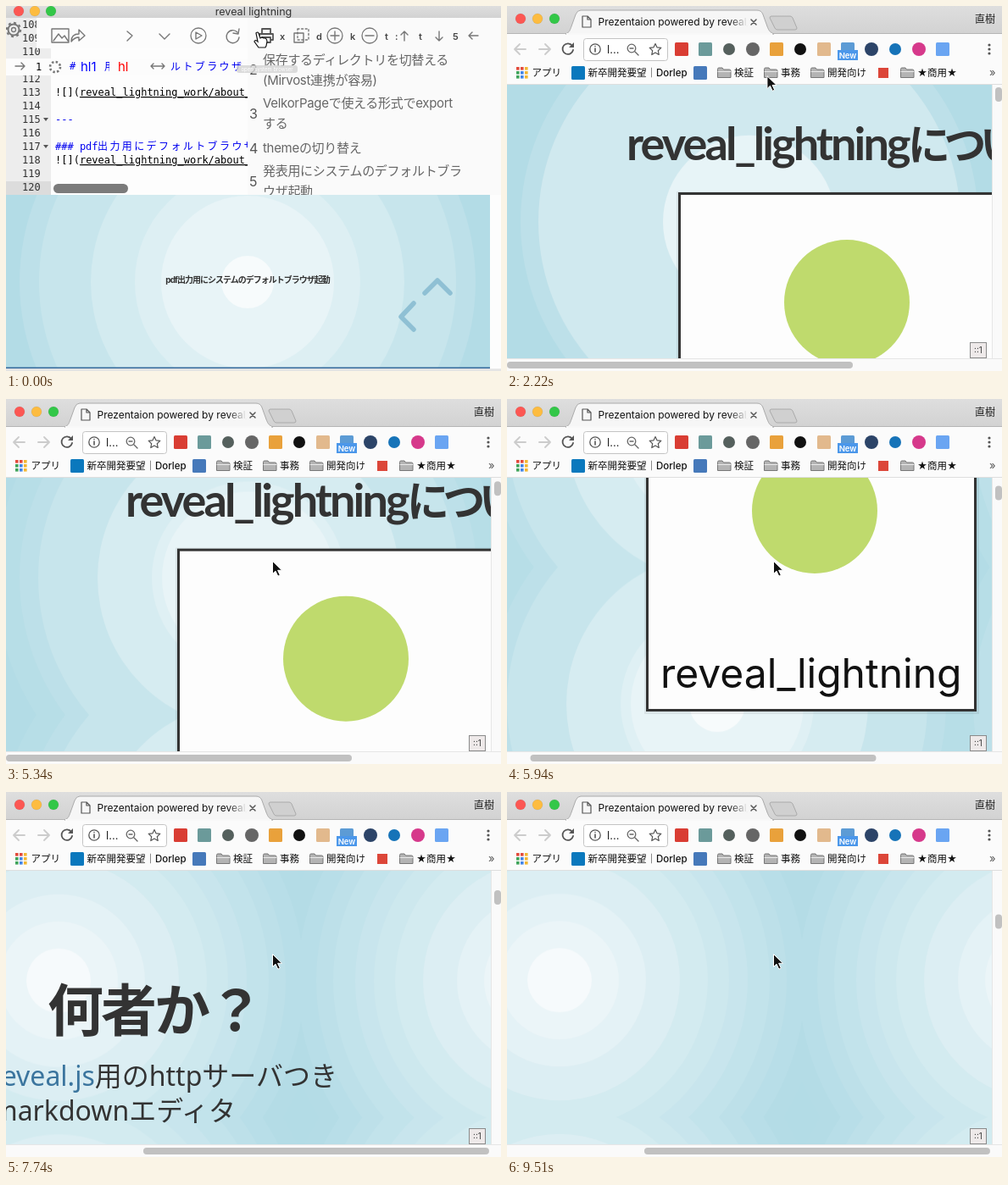
Write an HTML page that moves like this. It is 584 px wide and 431 px high and loops after 10 s.

```html
<!DOCTYPE html>
<html lang="ja">
<head>
<meta charset="utf-8">
<title>reveal lightning</title>
<style>
html, body { margin: 0; width: 100%; height: 100%; overflow: hidden; background: #fdfdfd; }
svg { display: block; width: 584px; height: 431px; }
text { font-family: Inter, 'Noto Sans CJK JP', 'Noto Sans CJK', sans-serif; white-space: pre; }
.mono { font-family: 'DejaVu Sans Mono', 'Noto Sans CJK JP', monospace; }
.noto { font-family: 'Noto Sans', 'Noto Sans CJK JP', sans-serif; }
.lato { font-family: Lato, 'Noto Sans CJK JP', sans-serif; }
.line { fill: none; stroke-linecap: round; stroke-linejoin: round; }
</style>
</head>
<body>
<svg id="stage" viewBox="0 0 584 431" xmlns="http://www.w3.org/2000/svg"></svg>
<script>
const text = (x, y, s, size, more = '') => `<text x="${x}" y="${y}" font-size="${size}" ${more}>${s}</text>`;
const rect = (x, y, w, h, fill, more = '') => `<rect x="${x}" y="${y}" width="${w}" height="${h}" fill="${fill}" ${more}/>`;
const dot = (x, y, r, fill, more = '') => `<circle cx="${x}" cy="${y}" r="${r}" fill="${fill}" ${more}/>`;
const line = (d, color = '#777', w = 1.4, more = '') => `<path class="line" d="${d}" stroke="${color}" stroke-width="${w}" ${more}/>`;
const ring = (x, y, r, color = '#777', w = 1.3, more = '') => dot(x, y, r, 'none', `stroke="${color}" stroke-width="${w}" ${more}`);
const group = (id, body) => `<g id="${id}">${body}</g>`;

// Sky gradient drawn as flat rings
const sky = k => `rgb(${[[247, 173], [251, 217], [252, 228]].map(([a, b]) => Math.round(a + (b - a) * k))})`;
const rings = (cx, cy, radii) => radii.map((r, n) =>
  dot(cx, cy, r, sky(n < radii.length - 1 ? (r + radii[n + 1]) / 658 : (r - 33) / 329))).join('');
const FLAT = [270, 249, 102];
const COARSE = [298, 270, 248, 178, 114, 102, 33];
const FINE = [310, 290, 268, 248, 222, 200, 175, 142, 102, 70, 38];
const TILE_W = 572, TILE_H = 323.5;
const tile = (id, radii) => `<pattern id="${id}" x="0" y="93" width="${TILE_W}" height="${TILE_H}" patternUnits="userSpaceOnUse">
  ${rect(0, 0, TILE_W, TILE_H, sky(.92))}${rings(TILE_W / 2, TILE_H / 2, radii)}</pattern>`;

const lights = (x, y, gap) => ['#fc5753', '#fdbc40', '#33c748'].map((c, n) =>
  dot(x + n * gap, y, 6, c, 'stroke="#000" stroke-opacity=".12" stroke-width=".6"')).join('');

function editor() {
  const row = n => 90 + (n - 112) * 16;
  const link = n => text(58, row(n), '![](<tspan text-decoration="underline">reveal_lightning_work/about_re</tspan>', 12, 'class="mono"');
  const wide = (x, y, s) => text(x, y, s, 12, 'class="mono" fill="#0000f0" letter-spacing="2.4"');
  const blue = (x, y, s) => text(x, y, s, 12, 'class="mono" fill="#0000f0"');
  let code = rect(0, 14, 53, 209, '#ededed') + rect(0, 207, 53, 16, '#dcdcdc');
  for (let n = 108; n <= 120; n++) if (n !== 111) code += text(19, row(n), n, 12, 'class="mono" fill="#333"');
  for (const n of [115, 117]) code += `<path d="M44 ${row(n) - 6}h6l-3 4z" fill="#555"/>`;
  code += link(113) + blue(58, row(115), '---') + blue(58, row(117), '### pdf') + wide(108, row(117), '出力用にデフォルトブラウザ') + link(118);
  code += rect(56, 210, 88, 11, '#7b7b7b', 'rx="5.5"');

  let tools = rect(36, 14, 249, 36, '#fcfcfc') + rect(0, 62, 285, 20, '#fcfcfc');
  tools += text(35, 76, '1', 12, 'class="mono"') + blue(75, 75, '#') + text(88, 77, 'hl1', 15, 'fill="#00f"')
    + `<g clip-path="inset(0 6px 0 0)">${blue(116, 76, '用')}</g>` + text(132, 77, 'hl', 15, 'fill="#f00"') + wide(194, 76, 'ルトブラウザ');
  tools += line('M11 71h11m-4-4l4 4-4 4M171 71h16m-13-3l-3 3 3 3m10-6l3 3-3 3');
  tools += ring(58, 72, 6, '#777', 2.6, 'stroke-dasharray="2.4 2.3"');
  tools += ring(9, 28, 6.5, '#777', 2) + ring(9, 28, 8.2, '#777', 2, 'stroke-dasharray="3 3.4"') + ring(9, 28, 2.5);

  let side = rect(285, 14, 299, 209, '#fafafa');
  const item = (y, s) => text(303, y, s, 15, 'fill="#666" letter-spacing="-.3"');
  side += item(69, '保存するディレクトリを切替える') + item(93, '(Mirvost連携が容易)')
    + item(120, 'VelkorPageで使える形式でexport') + item(144, 'する') + item(173, 'themeの切り替え')
    + item(200, '発表用にシステムのデフォルトブラ') + item(224, 'ウザ起動');
  [81, 133, 174, 213].forEach((y, n) => side += text(287, y, n + 2, 16, 'fill="#555"'));
  side += rect(272, 70, 72, 9, '#d4d4d4', 'rx="3" opacity=".8"') + text(308, 76.5, 'open system browser', 6, 'fill="#fff" text-anchor="middle"');

  let icons = line('M54 27h20v16h-20zM56 41l6-8 4 5 3-3 4 6M77 42c0-7 4-9 9-9v-5l7 7-7 6v-4c-4 0-6 1-9 5z');
  icons += line('M143 30l6 5-6 6M181 33l6 6 6-6') + ring(227, 35, 9) + line('M224 31v8l7-4z');
  icons += line('M273 31a7.5 7.5 0 1 0 2 6M275 27l-1 6-6-1');
  icons += line('M302 33v-6h10v6m-10 7h-3v-7h16v7h-3m-10-3h10v6h-10z', '#555', 1.8);
  icons += line('M344 27h13v13h-13z', '#777', 1.4, 'stroke-dasharray="2 2.6"') + line('M340 32h11v11h-11z');
  icons += ring(388, 35, 9) + line('M383 35h10m-5-5v10') + ring(429, 35, 9) + line('M424 35h10');
  icons += line('M470 41v-11m-4 4l4-4 4 4M511 30v11m-4-4l4 4 4-4M557 35h-11m4-4l-4 4 4 4');
  [[323, 'x'], [366, 'd'], [406, 'k'], [447, 't'], [459, ':'], [487, 't'], [527, '5']].forEach(([x, s]) =>
    icons += text(x, 40, s, 11, 'fill="#444" font-weight="600"'));

  let view = rect(0, 223, 571, 204, sky(.92)) + `<g clip-path="url(#viewClip)">${rings(285, 326, [269, 246, 185, 133, 102, 31])}</g>`;
  view += text(285, 327, 'pdf出力用にシステムのデフォルトブラウザ起動', 10, 'text-anchor="middle" font-weight="700" fill="#333" letter-spacing="-1"');
  view += line('M494 339l15-15 15 15M481 351l-15 16 15 15', '#8fc0d4', 5.5) + rect(0, 426.5, 571, 1.8, '#356a9c') + rect(0, 428.3, 584, 2.7, '#e4e4e4');

  const bar = rect(0, 0, 584, 14, 'url(#bar)') + lights(15, 6, 19) + text(292, 11, 'reveal lightning', 12.6, 'text-anchor="middle" fill="#333"');
  return rect(0, 0, 584, 431, '#fdfdfd') + `<g clip-path="url(#codeClip)">${code}${tools}</g>` + side + icons + view + bar;
}

function chrome() {
  let s = rect(0, 0, 584, 33, 'url(#bar)') + rect(0, 33, 584, 60, '#fbfbfb') + rect(0, 32, 584, 1, '#b5b5b5');
  s += `<path d="M69 33c5-2 5-4 7-9l5-14q2-5 6-5h208q5 0 7 5l5 14c2 5 3 7 8 9z" fill="#f6f6f6" stroke="#aaa"/>` + rect(70, 32, 243, 2, '#f8f8f8');
  s += lights(16, 15, 20) + '<path d="M312 12h22q2 0 3 2l5 12q0 2-2 2h-21q-2 0-3-2l-6-12q0-2 2-2z" fill="#d0d0d0" stroke="#aaa"/>';
  s += line('M288 16l6 6m0-6l-6 6', '#555', 1.5) + text(552, 20, '直樹', 12, 'fill="#222"');
  s += group('patch', rect(59, 34, 508, 24, '#f2f2f2'));
  s += group('docIcon', line('M89 12h6l4 4v9h-10zM95 12v4h4', '#555', 1.2));
  s += group('spinner', line('M1 -7a7 7 0 0 0 -5 12', '#4a86d8', 2));
  s += `<g mask="url(#fade)">${text(107.5, 23, '', 12, 'id="title" fill="#111"')}</g>`;
  s += line('M22 51h-12m5-6l-6 6 6 6M38 51h12m-5-6l6 6-6 6', '#ccc', 1.8);
  s += group('reload', line('M77 47a6.3 6.3 0 1 0 1 5', '#555', 1.8) + '<path d="M79 43v6h-6z" fill="#555"/>');
  s += group('stop', line('M67 46l10 10m0-10l-10 10', '#555', 1.8));
  s += rect(90.5, 38.5, 99, 26, '#fff', 'rx="3" stroke="#c4c4c4"') + ring(104, 51, 6.2, '#555') + line('M104 50v4m0-6.5v.1', '#555', 1.6);
  s += text(118, 56, 'l...', 13, 'fill="#222"') + ring(147, 50, 4.8, '#666') + line('M151 54l4 4m-10-8h4', '#666');
  s += line('M175 44.5l2 4.3 4.8.6-3.5 3.3.9 4.8-4.2-2.4-4.2 2.4.9-4.8-3.5-3.3 4.8-.6z', '#555', 1.2);
  const square = (x, c, y = 51) => rect(x - 8, y - 8, 16, 16, c, 'rx="1.5"');
  s += square(206, '#d93d33') + square(234, '#6b9a9a') + dot(262, 51, 7, '#55605d') + dot(290, 51, 8, '#666')
    + square(318, '#e9a13b') + dot(346, 51, 7, '#111') + square(374, '#e2b98d') + square(402, '#5c9bd5')
    + dot(430, 51, 8, '#2c4468') + dot(458, 51, 7, '#1673b8') + dot(486, 51, 8, '#d6398b') + square(514, '#6aa5f2');
  s += rect(390, 52, 24, 12, '#4b97ea') + text(402, 61.5, 'New', 9.5, 'fill="#fff" text-anchor="middle" font-weight="600"');
  for (const y of [46, 51, 56]) s += dot(569, y, 1.6, '#555');

  const label = (x, t) => text(x, 82.7, t, 11.5, 'fill="#111" font-weight="500"');
  const folder = x => `<path d="M${x + .5} 84.5v-10q0-1.5 1.5-1.5h4l1.5 2h7q1.5 0 1.5 1.5v8z" fill="#b4b4b4" stroke="#777"/>`
    + line(`M${x + 1} 77.5h15`, '#e8e8e8', 1);
  const hues = ['#e34a3a', '#e34a3a', '#f2b632', '#3fa45b', '#4285e8', '#f2b632', '#3fa45b', '#4285e8', '#f2b632'];
  hues.forEach((c, n) => s += rect(11 + n % 3 * 5, 72 + (n / 3 | 0) * 5, 3.6, 3.6, c));
  s += label(29.5, 'アプリ') + square(84, '#0a78bd', 79) + label(95.5, '新卒開発要望｜Dorlep') + square(228, '#4679ba', 79);
  [[248, '検証'], [303, '事務'], [358, '開発向け'], [464, '★商用★']].forEach(([x, t]) => s += folder(x) + label(x + 20, t));
  s += rect(438, 73, 12, 12, '#dc4639') + text(569, 83, '»', 13, 'fill="#555"') + rect(0, 92, 584, 1, '#dedede');
  return s;
}

function slides() {
  const bold = 'font-weight="700" fill="#333"';
  let s = rect(0, 0, 1000, 3000, 'url(#flat)', 'id="sky"');
  s += text(141, 182, 'reveal_lightning', 54, `class="lato" ${bold} letter-spacing="-2.9"`) + text(473, 182, 'について', 50, `${bold} letter-spacing="-7.5"`);
  s += rect(200, 219, 395, 371, '#000', 'opacity=".07"') + rect(203.5, 221.5, 387, 364, '#fdfdfd', 'stroke="#333" stroke-width="3"');
  s += dot(401, 350, 74, '#bfda6d') + text(219, 559, 'reveal_lightning', 48, 'fill="#111"');
  s += text(273, 961, '何者か？', 66, `${bold} letter-spacing="-3"`);
  const body = (x, y, t) => text(x, y, t, 32, 'class="noto" fill="#333" text-anchor="end"');
  return s + body(615, 1026, '<tspan fill="#3b759e">reveal.js</tspan>用のhttpサーバつき') + body(495, 1067, 'markdownエディタ');
}

const clip = (id, x, y, w, h) => `<clipPath id="${id}">${rect(x, y, w, h, '#000')}</clipPath>`;
const grad = (id, a, b, more) => `<linearGradient id="${id}" ${more}><stop stop-color="${a}"/><stop offset="1" stop-color="${b}"/></linearGradient>`;
const stage = document.getElementById('stage');
stage.innerHTML = `<defs>
  ${clip('codeClip', 0, 14, 285, 209)}${clip('viewClip', 0, 223, 571, 204)}${clip('pageClip', 0, 93, 572, 323)}
  ${grad('bar', '#dedede', '#d2d2d2', 'x2="0" y2="1"')}
  ${grad('edge', '#fff', '#000', 'gradientUnits="userSpaceOnUse" x1="262" x2="284"')}
  <mask id="fade" maskUnits="userSpaceOnUse" x="100" y="0" width="190" height="33">${rect(100, 0, 190, 33, 'url(#edge)')}</mask>
  ${tile('flat', FLAT)}${tile('coarse', COARSE)}${tile('fine', FINE)}</defs>`
  + group('editor', editor())
  + group('browser', rect(0, 0, 584, 431, '#fdfdfd')
    + group('page', `<g clip-path="url(#pageClip)">${group('slides', slides())}</g>`
      + rect(572, 93, 12, 338, '#fafafa') + rect(0, 416, 584, 15, '#fafafa') + line('M572.5 93v323M0 416.5h584', '#e6e6e6', 1)
      + rect(576, 96, 8, 17, '#c1c1c1', 'id="vThumb" rx="4"') + rect(0, 420, 408, 8, '#c1c1c1', 'id="hThumb" rx="4"')
      + rect(546.5, 397.5, 19, 18, '#eee9e9', 'stroke="#8a8a8a"') + text(556, 410, '::1', 10, 'text-anchor="middle" fill="#444"'))
    + chrome())
  + group('hand', '<path d="M-1 1q2-2 3 0l2 6 2-1 2 1 2 0q2 1 2 4l-1 5-1 2h-8l-5-7q0-2 3-1l1 1z" fill="#fff" stroke="#111" stroke-width="1.2"/>')
  + group('arrow', '<path d="M0 0v15l3.5-3.3 2.8 6 2.5-1.2-2.7-5.7h5z" fill="#111" stroke="#fff" stroke-width="1"/>');

const el = {};
stage.querySelectorAll('[id]').forEach(e => el[e.id] = e);
const show = (name, on) => el[name].style.display = on ? '' : 'none';
const move = (name, x, y, more = '') => el[name].setAttribute('transform', `translate(${x} ${y}) ${more}`);

function track(i, keys) {
  const n = keys.findIndex(k => k[0] >= i);
  if (n < 0) return keys[keys.length - 1][1];
  if (n === 0) return keys[0][1];
  const [a, u] = keys[n - 1], [b, v] = keys[n];
  return u + (v - u) * (i - a) / (b - a);
}

const STEP = 148.3, LOOP = 10000;
const SCROLL_Y = [[35, 0], [38, 130], [40, 218], [44, 218], [48, 430], [49, 430], [52, 679], [57, 1080], [64, 1650]];
const SCROLL_X = [[39, 0], [40, 38], [44, 224]];
const MOUSE_X = [[4, 298], [9, 302], [13, 304], [20, 316], [25, 316], [26, 315]];
const MOUSE_Y = [[4, 31], [9, 30], [13, 40], [20, 191], [25, 191], [26, 192]];

function draw(t) {
  const i = Math.floor((t + 15) / STEP);
  const loaded = i >= 13, open = i >= 4, grow = track(i, [[4, .5], [6, 1]]);
  const sx = track(i, SCROLL_X), sy = track(i, SCROLL_Y);
  const mx = track(i, MOUSE_X), my = track(i, MOUSE_Y);
  show('editor', i < 6);
  show('browser', open);
  move('browser', 292 * (1 - grow), 215 * (1 - grow), `scale(${grow})`);
  show('page', loaded);
  show('docIcon', loaded);
  show('reload', loaded);
  show('stop', !loaded);
  show('spinner', !loaded);
  show('patch', i < 10);
  move('spinner', 93, 18, `rotate(${(i - 9) * 50})`);
  el.title.textContent = loaded ? 'Prezentaion powered by reveal_lightning' : 'localhost:8000/reveal_view.html';
  el.sky.setAttribute('fill', `url(#${i < 36 ? 'flat' : i < 45 ? 'coarse' : 'fine'})`);
  move('slides', -sx, -sy);
  el.hThumb.setAttribute('x', sx * .723);
  el.vThumb.setAttribute('y', 96 + sy / 34);
  show('hand', !open);
  show('arrow', open);
  move('hand', mx - 2, my);
  move('arrow', mx - .5, my - .5);
}

function tick() {
  draw(performance.now() % LOOP);
  requestAnimationFrame(tick);
}
tick();
</script>
</body>
</html>
```
